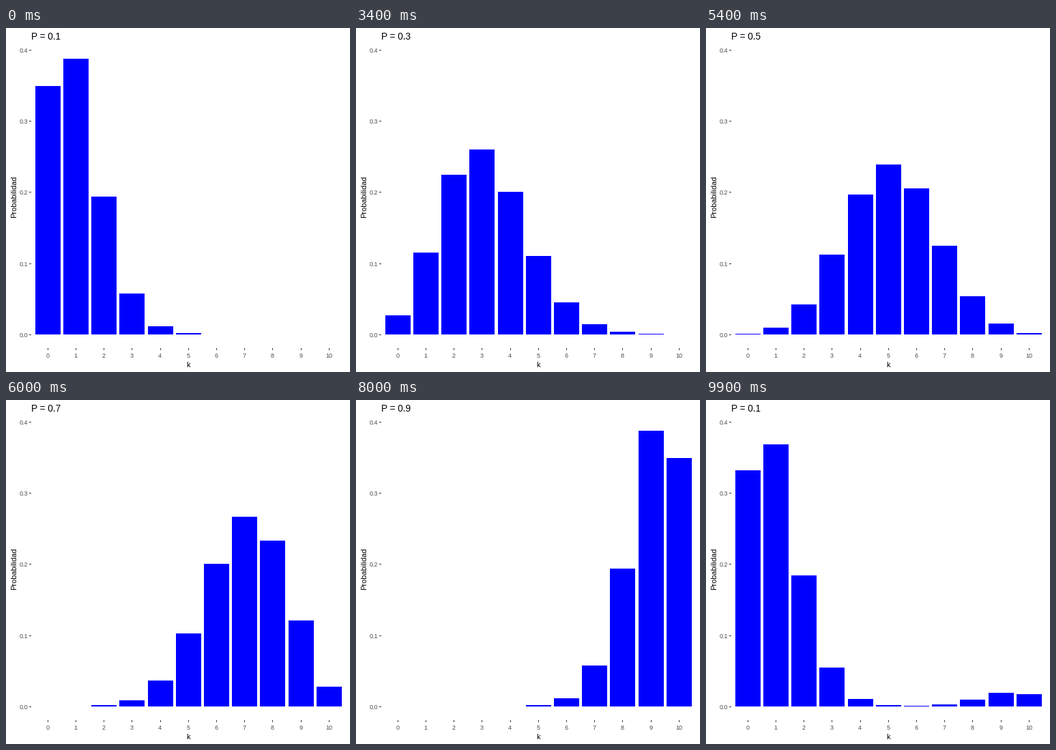
Write a matplotlib script that moves like this. It is 504 px wide and 504 px high and loops after 10 s.

```python
import math

import matplotlib.pyplot as plt
from matplotlib.animation import FuncAnimation
from matplotlib.patches import Rectangle

SIZE = 504
TRIALS = 10
PROBS = [0.1, 0.3, 0.5, 0.7, 0.9]
FRAMES_PER_STATE = 20
HOLD = 13                 # resting frames before each transition
BASE = 449                # y pixel of probability zero
UNIT = 1042.8             # pixels per unit of probability
FIRST, STEP = 61.35, 41.2  # centre of the first bar, bar spacing
BAR_WIDTH = 37

plt.rcParams["font.family"] = "Liberation Sans"


def binomial(p):
    return [math.comb(TRIALS, k) * p**k * (1 - p)**(TRIALS - k)
            for k in range(TRIALS + 1)]


def block(x, y, w, h, color):
    patch = Rectangle((x, y), w, h, facecolor=color, linewidth=0,
                      antialiased=False)
    return ax.add_patch(patch)


def label(x, y, text, size, color="black", ha="center", **kw):
    return ax.text(x, y, text, fontsize=size, color=color, ha=ha,
                   va="baseline", **kw)


fig = plt.figure(figsize=(SIZE / 72, SIZE / 72), dpi=72, facecolor="white")
ax = fig.add_axes([0, 0, 1, 1])
ax.set_xlim(0, SIZE)
ax.set_ylim(SIZE, 0)
ax.axis("off")

# Axes: ticks and labels
for i in range(5):
    y = round(BASE - UNIT * i / 10)
    block(34, y, 3, 1, "#333333")
    label(32, y + 4, f"{i / 10:.1f}", 9, "#4d4d4d", ha="right")

for k in range(TRIALS + 1):
    x = FIRST + STEP * k
    block(int(x), 469, 1, 3, "#333333")
    label(x - 0.4, 483, str(k), 9, "#4d4d4d")

label(267, 497, "k", 11)
ax.text(15, 247.7, "Probabilidad", fontsize=11, rotation=90,
        rotation_mode="anchor", ha="center", va="baseline")
title = label(36.6, 17, "", 13.6, ha="left")

bars = [block(round(FIRST - 18.55 + STEP * k), BASE, BAR_WIDTH, 0, "#0000ff")
        for k in range(TRIALS + 1)]
states = [binomial(p) for p in PROBS]


def update(frame):
    now, step = divmod(frame, FRAMES_PER_STATE)
    after = (now + 1) % len(PROBS)
    t = max(0, step - HOLD) / (FRAMES_PER_STATE - HOLD)
    ease = (1 - math.cos(math.pi * t)) / 2
    for bar, a, b in zip(bars, states[now], states[after]):
        top = round(BASE - UNIT * (a + (b - a) * ease))
        bar.set_y(top)
        bar.set_height(BASE - top)
    title.set_text(f"P = {PROBS[now if t < 0.5 else after]}")
    return [*bars, title]


anim = FuncAnimation(fig, update, frames=FRAMES_PER_STATE * len(PROBS),
                     interval=100, repeat=True, repeat_delay=0, blit=False)
plt.show()
```
